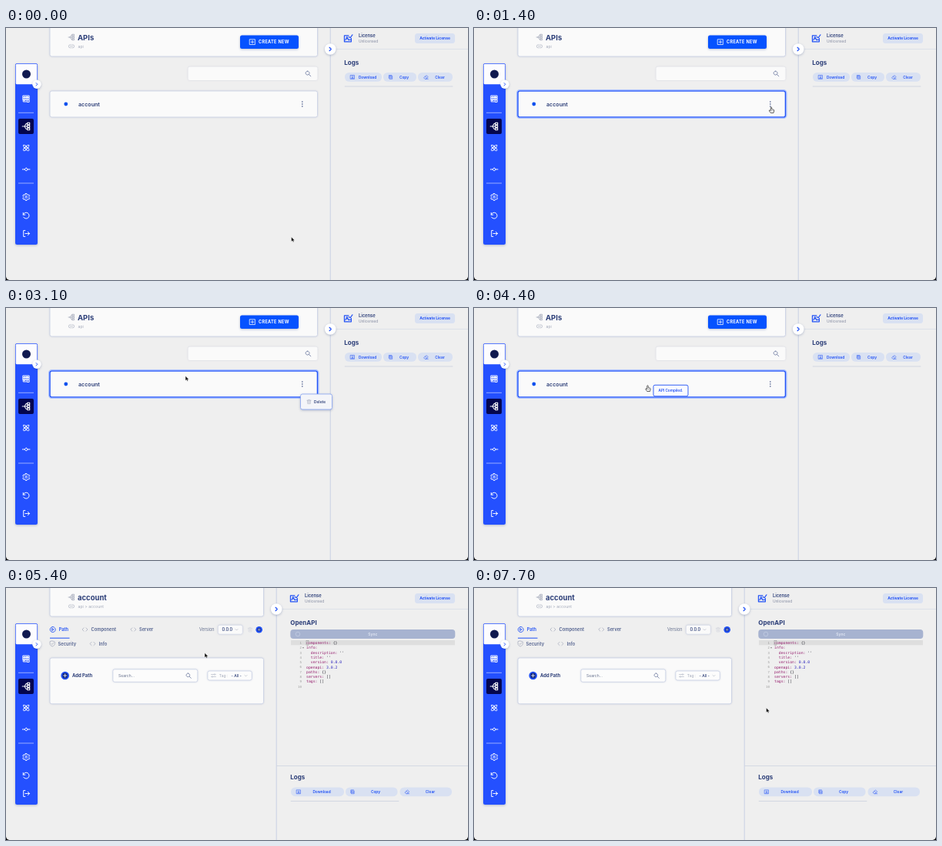
Animation of 600 by 328 pixels, one loop 7800 ms. Source, as an HTML page:

```html
<!DOCTYPE html>
<html lang="en">
<head>
<meta charset="utf-8">
<title>API editor</title>
<style>
  html, body { margin: 0; width: 100%; height: 100%; overflow: hidden; background: #efefef; }
  svg { display: block; width: 600px; height: 328px; }
  text { font-family: Inter, "Liberation Sans", sans-serif; white-space: pre; }
  .code text { font-family: "DejaVu Sans Mono", monospace; }
  .shadow { filter: drop-shadow(0 1px 1.5px rgba(50, 70, 130, .32)); }
  .soft { filter: drop-shadow(0 .5px 1px rgba(50, 70, 130, .16)); }
</style>
</head>
<body>
<svg id="stage" viewBox="0 0 600 328" xmlns="http://www.w3.org/2000/svg"></svg>
<script>
const BLUE = '#2151f5', NAVY = '#2c3e78', GREY = '#a3a9ba', EDGE = '#c8d0e4', PILL = '#d9e1f2';
const LOOP = 7800;

// Icon outlines on a 24 x 24 grid
const ICONS = {
  server: 'M3 3h18v6H3zM3 9h18v6H3zM3 15h9M3 15v6h9M6 6h2M11 6h7M6 12h2M11 12h7M6 18h2M15 16h6v6h-6z',
  tree: 'M2 12h12M7 12c3 0 2-7 6-7h2M7 12c3 0 2 7 6 7h2M15 2.500h6v5h-6zM15 9.500h6v5h-6zM15 16.500h6v5h-6z',
  atom: 'M12 9a3 3 0 1 0 .1 0M4 4c4-4 20 12 16 16S0 8 4 4zM20 4c4 4-12 20-16 16S16 0 20 4z',
  commit: 'M1 12h7M16 12h7M12 8a4 4 0 1 0 .1 0',
  gear: 'M10 2h4l1 3 2 1 3-1 2 4-2 2v2l2 2-2 4-3-1-2 1-1 3h-4l-1-3-2-1-3 1-2-4 2-2v-2L2 9l2-4 3 1 2-1zM12 9a3 3 0 1 0 .1 0',
  undo: 'M3 4v6h6M3 10a9 9 0 1 1 1 7',
  exit: 'M9 3H4v18h5M9 12h13M17 7l5 5-5 5',
  search: 'M10 3a7 7 0 1 0 .1 0M15.500 15.500L22 22',
  link: 'M10 6H7a6 6 0 0 0 0 12h3M14 6h3a6 6 0 0 1 0 12h-3M7 12h10',
  plusBox: 'M3 3h18v18H3zM12 7v10M7 12h10',
  license: 'M20 12v9H2V5h11M5 17c0-5 8-5 8 0M9 9a2 2 0 1 0 .1 0M14 8l3 3 6-8M15 16h3',
  download: 'M3 3h18v18H3zM12 6v9M8 11l4 4 4-4M7 18h10',
  copy: 'M8 7h12v14H8zM4 17V3h13M11 12h6M11 16h6',
  erase: 'M2 14L14 4l8 7-10 10H8zM8 9l8 8M12 21h10',
  trash: 'M3 6h18M9 6V3h6v3M5 6l1 15h12l1-15M10 10v7M14 10v7',
  tags: 'M8 6L2 12l6 6M16 6l6 6-6 6',
  shield: 'M12 2l9 3v7c0 5-4 8-9 10-5-2-9-5-9-10V5zM8 12l3 3 5-6',
  target: 'M12 2a10 10 0 1 0 .1 0M10 8l6 4-6 4z',
  filter: 'M2 7h13M20 7h2M17 4v6M2 17h3M10 17h12M7 14v6',
  right: 'M8 4l8 8-8 8',
  down: 'M4 8l8 8 8-8',
  plus: 'M12 5v14M5 12h14'
};

const rect = (x, y, w, h, r, fill, extra = '') =>
  `<rect x="${x}" y="${y}" width="${w}" height="${h}" rx="${r}" fill="${fill}" ${extra}/>`;
const circle = (x, y, r, fill, extra = '') => `<circle cx="${x}" cy="${y}" r="${r}" fill="${fill}" ${extra}/>`;
const line = (x1, y1, x2, y2, color = EDGE, width = 1) =>
  `<path d="M${x1} ${y1}L${x2} ${y2}" stroke="${color}" stroke-width="${width}"/>`;
const text = (x, y, size, label, fill = NAVY, weight = 600, extra = '') =>
  `<text x="${x}" y="${y}" font-size="${size}" font-weight="${weight}" fill="${fill}" ${extra}>${label}</text>`;
const icon = (name, cx, cy, size, color, width = 2) =>
  `<path transform="translate(${cx - size / 2} ${cy - size / 2}) scale(${size / 24})" d="${ICONS[name]}"
    fill="none" stroke="${color}" stroke-width="${width}" stroke-linejoin="round" stroke-linecap="round"/>`;
const group = (id, body, attrs = '') => `<g id="${id}" ${attrs}>${body}</g>`;
const border = (color = EDGE, cls = 'soft') => `stroke="${color}" stroke-width=".8" class="${cls}"`;

function knob(x, y, r) {
  return circle(x, y, r, '#fff', 'class="shadow"') + icon('right', x, y, r * .9, BLUE, 4.5);
}

function sidebar() {
  const items = [['server', 92], ['tree', 128], ['atom', 156], ['commit', 184], ['gear', 220], ['undo', 244], ['exit', 267.5]];
  return rect(12, 46, 29, 236, 2.5, '#2450ff', 'class="shadow"') +
    rect(12.700, 46.700, 27.600, 26.500, 1.5, '#fcfcff') +
    circle(26.5, 60, 5.5, '#10194f') +
    rect(16, 118, 20, 20, 2, '#04064f') +
    line(16, 110.3, 36, 110.3, '#b5c5ff', .8) + line(16, 202, 36, 202, '#b5c5ff', .8) +
    items.map(([name, y]) => icon(name, 26.2, y, name === 'tree' ? 12 : 10.5, '#fff', 2.2)).join('') +
    knob(40, 73.3, 5.7);
}

function header(right, title, trail) {
  return rect(57, -8, right - 57, 45, 2.5, '#fafafa', border()) +
    icon('tree', 85, 12, 9.5, GREY, 2) + text(93, 15.5, 9.5, title, NAVY, 700) +
    icon('link', 85, 23.800, 8, GREY, 1.8) + text(93.5, 25.700, 5.2, trail, GREY, 400);
}

function licensePanel(x, indent) {
  return line(x, 0, x, 328) + line(x, 27.5, 600, 27.5, '#d9dde8', .8) +
    icon('license', x + indent + 5, 13.3, 12, BLUE, 2.3) +
    text(x + indent + 18.5, 11.700, 5.8, 'License') +
    text(x + indent + 18.5, 19, 4.8, 'Unlicensed', '#858ca2', 400) +
    rect(531, 7, 52, 13, 3.5, PILL) + text(557, 15.300, 4.9, 'Activate License', BLUE, 700, 'text-anchor="middle"') +
    knob(x, 27.5, 7.3);
}

function logs(x, y, buttons) {
  const names = [['download', 'Download'], ['copy', 'Copy'], ['erase', 'Clear']];
  return text(x, y, 8, 'Logs', NAVY, 700) + names.map(([glyph, label], i) => {
    const [left, width, iconX, labelX] = buttons[i];
    return rect(left, y + 10.2, width, 11.800, 5.5, PILL) + icon(glyph, iconX, y + 16.1, 6.5, BLUE, 2) +
      text(labelX, y + 17.800, 4.8, label, BLUE, 600, 'text-anchor="middle"');
  }).join('') + line(x + .5, y + 28.2, x + 141, y + 28.2, '#ccd2de', .9);
}

function listPage() {
  const dots = [96, 99, 102].map(y => circle(384.800, y, .75, NAVY)).join('');
  return header(404.5, 'APIs', 'api') +
    rect(304, 9.5, 76, 17.5, 2.5, '#0552ff', 'class="shadow"') + icon('plusBox', 320, 18.2, 9, '#fff', 2) +
    text(328, 20.300, 5.6, 'CREATE NEW', '#fff', 700, 'letter-spacing=".3"') +
    rect(236.5, 50.5, 168, 17.5, 2.5, '#fafafa', 'class="soft"') + icon('search', 392.3, 59.3, 8.5, '#53628f', 2) +
    rect(57, 82, 347.5, 34, 2.5, '#fafafa', border()) +
    group('hover', rect(56.5, 81.5, 348.5, 35, 3, 'none', 'stroke="#a9c0ff" stroke-width="3"') +
      rect(57, 82, 347.5, 34, 2.5, 'none', `stroke="${BLUE}" stroke-width="1.2"`)) +
    circle(77.800, 99, 2.4, '#0b50ee') + text(94, 101.600, 7.1, 'account') + dots +
    licensePanel(421.2, 18.2) +
    logs(439.3, 47.800, [[440, 48, 450, 469.5], [490, 43, 499.5, 517], [535, 45, 545.5, 563.5]]) +
    group('menu', rect(382.5, 112, 41, 20, 2.5, '#f4f5f9', border('#88a5f2', 'shadow')) +
      icon('trash', 393.5, 122, 7, GREY, 1.8) + text(400, 123.700, 4.85, 'Delete')) +
    group('tip', rect(8, 0, 45, 14.5, 2, '#fafbff', `stroke="${BLUE}" stroke-width=".9"`) +
      text(30.5, 9, 4.7, 'API Compiled.', BLUE, 600, 'text-anchor="middle"'));
}

function editor() {
  const rows = [['components:', ' {}'], ['info:'], ["  description:", " ''"], ["  title:", " ''"],
    ['  version:', ' 0.0.0'], ['openapi:', ' 3.0.2'], ['paths:', ' {}'], ['servers:', ' []'], ['tags:', ' []'], ['']];
  return rect(370, 68, 213, 6.4, 0, '#dedede') + rows.map(([key, value = ''], i) => {
    const y = 73 + i * 6.31;
    const color = /\d/.test(value) ? '#2a22bd' : '#30303a';
    return text(383.800, y - .1, 4, i + 1, '#999', 400, 'text-anchor="end"') +
      text(390, y, 4.8, `<tspan fill="#97206f">${key}</tspan>${value}`, color, 400);
  }).join('') + '<path d="M385 77.200h2l-1 1.500z" fill="#666"/>' +
    rect(390, 68.6, 2.9, 5.5, 0, 'none', 'stroke="#777" stroke-width=".4"');
}

function detailPage() {
  return header(334.5, 'account', 'api &gt; account') +
    icon('target', 60.700, 54, 8.5, BLUE, 2.4) + text(68.700, 56, 5.7, 'Path', BLUE) + line(57, 65.2, 82.5, 65.2, BLUE, 1) +
    icon('tags', 102.5, 54, 8.5, GREY) + text(110.5, 56, 5.75, 'Component', '#53628f') +
    icon('tags', 165.3, 54, 8.5, GREY) + text(173, 56, 5.7, 'Server', '#53628f') +
    icon('shield', 60.2, 72.5, 8.5, GREY) + text(67.5, 74.600, 5.8, 'Security', '#53628f') +
    icon('tags', 112.5, 72.5, 8.5, GREY) + text(120.800, 74.600, 5.6, 'Info', '#53628f') +
    text(251, 56.200, 5.5, 'Version', '#66718f', 400) +
    rect(275.3, 48.2, 32, 12, 2.5, '#fafafa', border('#d5dae8')) + text(280.5, 56.200, 5.6, '0.0.0', NAVY, 500) +
    icon('down', 299.5, 54.3, 4.5, GREY, 3) + icon('trash', 317, 54.2, 7.5, '#d0d3db', 1.8) +
    circle(328.700, 54.2, 4.3, BLUE) + circle(328.700, 54.2, 2.4, '#182f91') + icon('plus', 328.700, 54.2, 5, '#dce5ff', 2.5) +
    rect(57, 91, 277.5, 59.800, 2.5, '#fafafa', border()) +
    circle(76.700, 114, 5.3, BLUE) + circle(76.700, 114, 3.4, '#132777') + icon('plus', 76.700, 114, 7, '#fff', 2.8) +
    text(86, 116.200, 5.9, 'Add Path', NAVY, 700) +
    rect(138.800, 105.800, 110, 16.5, 2.5, '#fcfcfc', border()) + text(146, 115.700, 5, 'Search...', '#65708d', 400) +
    icon('search', 237, 114, 8, '#53628f', 2) +
    rect(261.800, 108, 57.5, 12, 2.5, '#fcfcfc', border()) + icon('filter', 269.5, 114, 7, GREY, 2) +
    text(276.800, 115.800, 5, 'Tag :', GREY, 400) + text(292.5, 115.800, 5, '- All -', NAVY, 500) +
    icon('down', 311.5, 114.2, 4.5, GREY, 3) +
    licensePanel(351.2, 18.2) + text(369.3, 47.800, 8, 'OpenAPI', NAVY, 700) +
    rect(369.3, 54, 214, 12, 4, '#a7b3d0') + circle(379, 60, 2.8, 'none', 'stroke="#c6d0e5" stroke-width=".7"') +
    text(476.3, 61.800, 4.9, 'Sync', '#e3e8f4', 600, 'text-anchor="middle"') +
    group('code', editor(), 'class="code"') + line(351.2, 231.5, 600, 231.5, '#d2d7e4', .9) +
    logs(369.3, 249.2, [[370, 69, 380, 410], [441, 67.5, 450, 480], [511.5, 67.5, 521, 551]]);
}

const arrow = '<path d="M0 0V6L1.500 4.800L2.500 6.800L3.600 6.300L2.700 4.400H4.500Z" fill="#080808" stroke="#fff" stroke-width=".45"/>';
const hand = `<path d="M-.7 .8Q0-.4 .7 .8V3.200L3 3.700Q4 4 3.700 5.500L3 8H-.7L-2.500 5.500Q-3 4.200-1.800 4.400L-.7 5.200Z"
  fill="#fff" stroke="#111" stroke-width=".65" stroke-linejoin="round"/><path d="M.7 4.500v1.600M2 4.500v1.600" stroke="#333" stroke-width=".35"/>`;

document.getElementById('stage').innerHTML =
  rect(0, 0, 600, 328, 0, '#efefef') + group('list', listPage()) + group('detail', detailPage()) + sidebar() +
  '<path d="M0 323.500V328H4.500Q.500 327.500 0 323.500ZM600 323.500V328H595.500Q599.500 327.500 600 323.500Z" fill="#000"/>' +
  group('arrow', arrow) + group('hand', hand);

const part = Object.fromEntries(['list', 'detail', 'hover', 'menu', 'tip', 'arrow', 'hand']
  .map(id => [id, document.getElementById(id)]));
const show = (node, on) => node.setAttribute('visibility', on ? 'inherit' : 'hidden');
const place = (node, x, y) => node.setAttribute('transform', `translate(${x} ${y})`);

// Pointer stops: time, x, y
const STOPS = [[0, 370.5, 272], [150, 370.5, 272], [1250, 386, 102.5], [2300, 386, 102.5], [3050, 233, 88.5],
  [3500, 233, 88.5], [4000, 225.5, 100.5], [4800, 225.5, 100.5], [5350, 258, 84.5], [5500, 258, 84.5],
  [6500, 379.5, 156], [LOOP, 379.5, 156]];

function pointerAt(t) {
  const i = STOPS.findIndex(stop => stop[0] > t);
  const [t0, x0, y0] = STOPS[i - 1], [t1, x1, y1] = STOPS[i];
  const u = (t - t0) / (t1 - t0), k = u * u * (3 - 2 * u);
  return [x0 + (x1 - x0) * k, y0 + (y1 - y0) * k];
}

function render(t) {
  const [x, y] = pointerAt(t);
  const onList = t < 4700, menuOpen = t >= 1700 && t < 3600;
  const overCard = onList && x > 57 && x < 404 && y > 82 && y < 116;
  const pointing = overCard && !menuOpen;
  show(part.list, onList);
  show(part.detail, !onList);
  show(part.hover, onList && (overCard || menuOpen));
  show(part.menu, menuOpen);
  show(part.tip, onList && t >= 4000);
  place(part.tip, x - .5, y - .2);
  for (const [node, on] of [[part.arrow, !pointing], [part.hand, pointing]]) {
    show(node, on);
    place(node, x, y);
  }
}

const start = performance.now();
function tick() {
  render((performance.now() - start) % LOOP);
  requestAnimationFrame(tick);
}
tick();
</script>
</body>
</html>
```
